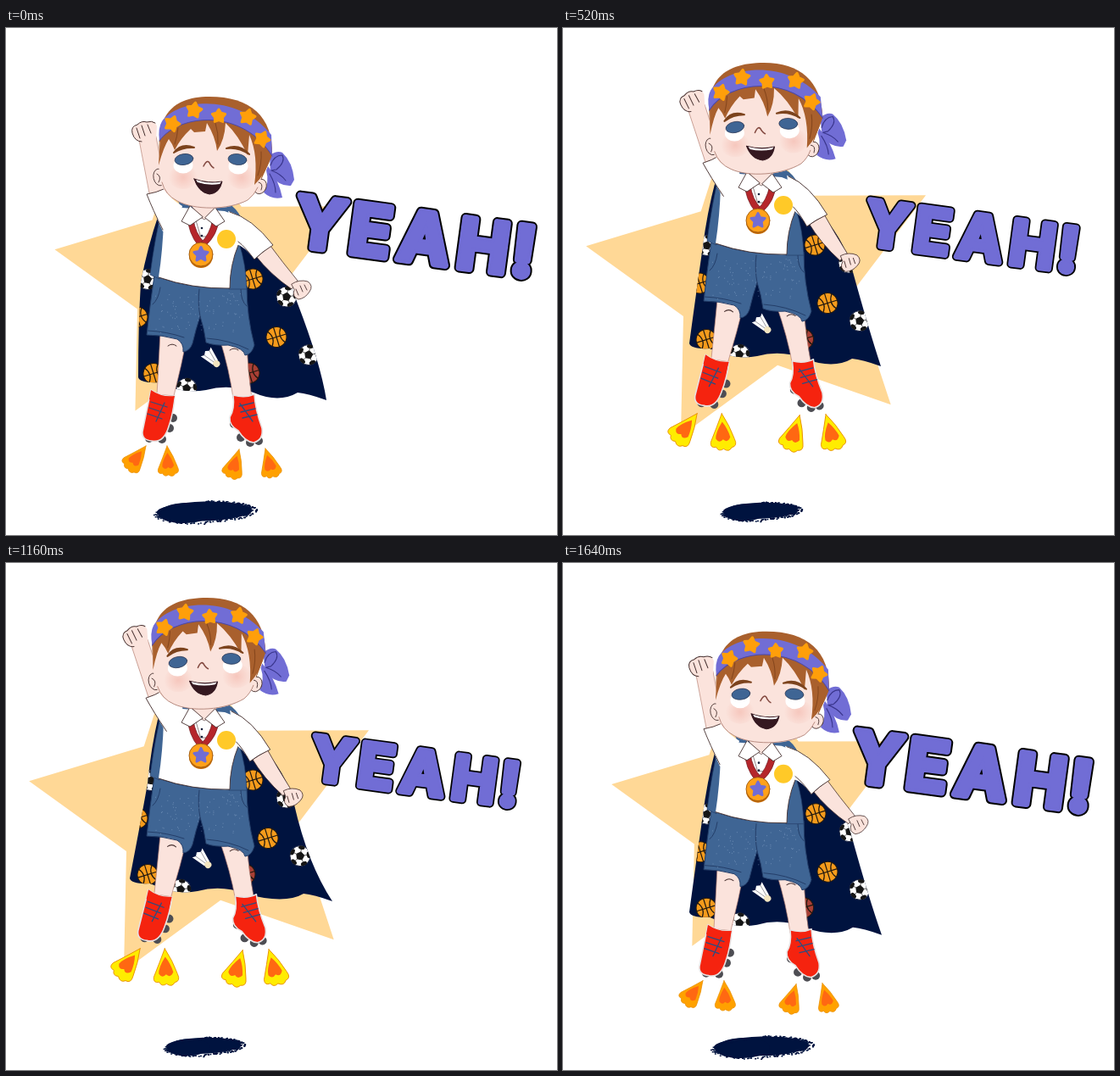
An HTML page with a canvas for the animation above (1680 ms loop, 650x598 px).

```html
<!DOCTYPE html>
<html lang="en">
<head>
<meta charset="utf-8">
<title>Yeah!</title>
<style>
html, body { margin: 0; width: 100%; height: 100%; overflow: hidden; background: #fff; }
canvas { display: block; }
</style>
</head>
<body>
<canvas id="stage" width="650" height="598"></canvas>
<script>
const ctx = document.getElementById('stage').getContext('2d');
const LOOP = 1680, STEP = 40, LIFT = -58.5;
const NAVY = '#00133f', BLUE = '#3f6594', PURPLE = '#716dd5', ORANGE = '#ff9f0a',
  SKIN = '#fbe3dc', HAIR = '#a9602d', RED = '#f5230f', LINE = '#46302f', INK = '#17203c';
const rad = deg => deg * Math.PI / 180;
const lerp = (a, b, k) => a + (b - a) * k;

function paint(path, fill, stroke, width = 1) {
  if (fill) { ctx.fillStyle = fill; ctx.fill(path); }
  if (stroke) { ctx.strokeStyle = stroke; ctx.lineWidth = width; ctx.stroke(path); }
}
const shape = (d, fill, stroke, width) => paint(new Path2D(d), fill, stroke, width);
const line = (d, stroke = LINE, width = 1) => shape(d, null, stroke, width);

function oval(x, y, rx, ry, fill, stroke, width, angle = 0) {
  const path = new Path2D();
  path.ellipse(x, y, rx, ry, rad(angle), 0, Math.PI * 2);
  paint(path, fill, stroke, width);
}

function star(x, y, radius, ratio, angle, fill) {
  const path = new Path2D();
  for (let i = 0; i < 10; i++) {
    const r = i % 2 ? radius * ratio : radius, a = rad(angle - 90 + i * 36);
    path.lineTo(x + r * Math.cos(a), y + r * Math.sin(a));
  }
  path.closePath();
  paint(path, fill, radius < 20 && fill, 3);
}

// Runs draw in a frame moved by (dx, dy) and turned about (px, py).
function posed(px, py, angle, dx, dy, draw) {
  ctx.save();
  ctx.translate(px + dx, py + dy);
  ctx.rotate(rad(angle));
  ctx.translate(-px, -py);
  draw();
  ctx.restore();
}

function seeded(seed) {
  return () => (seed = seed * 16807 % 2147483647) / 2147483647;
}

function drawShadow(p) {
  const rx = lerp(58, 40, p), ry = lerp(12, 9, p), rnd = seeded(7);
  ctx.save();
  ctx.translate(lerp(234, 232.5, p), lerp(570, 569, p));
  ctx.rotate(rad(-1.5));
  oval(0, 0, rx * 0.97, ry * 0.95, NAVY);
  oval(-rx * 0.38, 1.5, rx * 0.55, ry, NAVY);
  ctx.fillStyle = NAVY;
  for (let i = 0; i < 260; i++) {
    const a = rnd() * Math.PI * 2, r = 0.9 + rnd() * 0.16;
    ctx.fillRect(rx * r * Math.cos(a), ry * r * Math.sin(a) + (Math.cos(a) < 0 ? 2 : 0), 2, 1.5);
  }
  ctx.restore();
}

function basketball(x, y, fill = '#f59b1c') {
  ctx.save();
  ctx.translate(x, y);
  ctx.rotate(-0.3);
  oval(0, 0, 12, 12, fill, '#21180f', 1);
  line('M-12 0H12M0 -12V12M-8 -9Q-1 0 -8 9M8 -9Q1 0 8 9', '#21180f', 1.2);
  ctx.restore();
}

function football(x, y) {
  oval(x, y, 12, 12, '#fff', INK, 1);
  star(x, y, 3.6, 0.8, 10, '#151515');
  for (let i = 0; i < 5; i++) {
    const a = rad(i * 72 - 80);
    const c = Math.cos(a), s = Math.sin(a);
    oval(x + 10 * c, y + 10 * s, 2.2, 3.8, '#151515', null, 0, i * 72 - 80);
    line(`M${x + 4 * c} ${y + 4 * s}L${x + 8 * c} ${y + 8 * s}`, '#333', 0.8);
  }
}

function shuttlecock(x, y) {
  posed(x, y, -42, 0, 0, () => {
    shape(`M${x - 8} ${y - 11}L${x - 4} ${y - 9}L${x} ${y - 12}L${x + 4} ${y - 9}L${x + 8} ${y - 11}L${x + 4} ${y + 6}H${x - 4}Z`, '#fff');
    line(`M${x - 4} ${y - 9}L${x - 1} ${y + 5}M${x + 4} ${y - 9}L${x + 1} ${y + 5}`, '#8a8a92', 0.8);
    oval(x, y + 8, 4, 4, '#f3e5c0');
  });
}

// Sideways drift of the cape's upper part, lower part and tip over half a loop.
const SWAY_TIMES = [0, 40, 320, 480, 520, 800, 840];
const SWAY = {
  upper: [0, -3, 0, 2, 6, 7, 0],
  lower: [0, -3, -10, -11.5, -7, -7, 0],
  tip: [0, 5, 7, 5, -3, -2, 0]
};
function sway(part, t) {
  t %= LOOP / 2;
  const i = SWAY_TIMES.findIndex(k => k > t);
  const k = (t - SWAY_TIMES[i - 1]) / (SWAY_TIMES[i] - SWAY_TIMES[i - 1]);
  return lerp(SWAY[part][i - 1], SWAY[part][i], k);
}

function drawCape(t) {
  const u = sway('upper', t), l = sway('lower', t), e = sway('tip', t);
  const cape = new Path2D(`M180 220Q${167 - l * 0.4} 258 ${159 - l * 0.8} 300Q${156 - l * 0.2} 350 ${156 + l} 412
    Q${158 + l} 419 ${180 + l} 418Q${208 + l} 432 ${236 + l} 427Q${264 + l} 419 ${292 + l} 430
    Q${322 + e} 443 ${344 + e} 430Q${356 + e} 431 ${378 + e} 439Q${371 + l * 1.5} 395 ${344 + l * 0.4} 325Q330 285 300 255Z`);
  paint(cape, NAVY);
  ctx.save();
  ctx.clip(cape);
  basketball(291 + u, 296);
  football(331 + u, 317);
  basketball(319 + l, 364.5);
  football(357 + l, 385.5);
  basketball(174 + l * 0.7, 407.5);
  basketball(155 + u, 341);
  football(167 - l * 0.4, 296.5);
  football(213 + l * 0.7, 425);
  basketball(287 + l * 0.5, 407, '#a83f35');
  shuttlecock(243 + l, 390);
  ctx.restore();
}

// Tip at rest and at the top of the jump, then lean.
const FLAMES = [
  [165, 493, 155, 437, 38], [190, 493, 186, 437, -3],
  [275, 497, 281, 438, 17], [306, 496, 312, 437, -15]
];
function drawFlames(p) {
  const heat = Math.min(1, p * 1.35);
  const outer = `rgb(255,${lerp(160, 242, heat)},0)`;
  for (const [x0, y0, x1, y1, lean] of FLAMES) {
    ctx.save();
    ctx.translate(lerp(x0, x1, p), lerp(y0, y1, p));
    ctx.rotate(rad(lean));
    const s = lerp(1, 1.33, p);
    ctx.scale(s, s);
    shape('M0 0Q-6 14 -12 27Q-13 33 -7 32Q-5 37 0 34Q5 38 8 33Q14 32 11 25Q7 12 0 0Z', outer, '#e98e00', 0.7);
    shape('M0 8Q-7 18 -7 24Q-4 29 0 25Q4 29 7 23Q5 15 0 8Z', '#ff6812');
    ctx.restore();
  }
}

function drawLeftLeg() {
  shape('M182 358L214 362Q207 398 198 434L178 432Q180 400 182 358Z', SKIN, '#b88478', 0.7);
  line('M191 375Q196 371 201 375');
  [[197, 460], [193, 472], [184, 485], [169, 484]].forEach(([x, y]) => oval(x, y, 5, 5, '#4d4d53'));
  shape('M171 427Q184 436 199 434Q198 452 192 470Q186 490 172 487Q160 486 161 476Q166 452 171 427Z', RED, '#e8e2e2', 1.6);
  shape('M171 427Q184 436 199 434Q197 442 196 449Q181 444 169 438Z', RED);
  line('M171 441L190 447M169 448L187 454M167 455L184 461M187 442L177 464', '#2f4c7e', 1.3);
}

function drawRightLeg() {
  shape('M252 366L284 370Q285 405 290 437L268 437Q264 405 252 366Z', SKIN, '#b88478', 0.7);
  line('M264 380Q269 376 274 380');
  [[269, 467], [277, 483], [288, 489], [298, 487]].forEach(([x, y]) => oval(x, y, 5, 5, '#4d4d53'));
  shape('M268 433Q282 437 293 432Q294 450 302 472Q304 486 292 489Q282 488 274 475Q263 469 264 459Q270 450 268 433Z', RED, '#e8e2e2', 1.6);
  line('M275 446L292 442M277 453L294 449M279 460L296 456M276 443L291 464', '#2f4c7e', 1.3);
}

function drawShorts() {
  shape('M175 292Q225 312 284 304Q284 340 293 374Q290 385 282 386Q281 378 262 374Q246 375 236 371Q234 355 229 340Q224 355 220 372Q217 381 209 382Q210 372 202 367Q184 362 166 362Q170 325 175 292Z', BLUE, '#243e69', 1);
  line('M229 340Q226 325 228 308M167 357Q190 358 210 365M237 366Q264 368 286 379M182 306Q180 320 173 326M277 308Q277 322 284 328', '#243e69', 1);
  const rnd = seeded(31);
  ctx.fillStyle = 'rgba(150,178,212,.5)';
  for (let i = 0; i < 90; i++) ctx.fillRect(176 + rnd() * 104, 312 + rnd() * 48, 1, 1);
}

function drawTorso() {
  shape('M184 214Q176 245 170 291L181 296L188 235Z', BLUE, '#243e69', 0.7);
  shape('M275 254Q283 278 284 308L263 308L266 272Z', BLUE, '#243e69', 0.7);
  shape('M203 204L262 207Q272 212 278 225L210 221Z', BLUE);
  shape('M208 212L186 226Q185 262 180 294Q220 308 264 307Q264 280 274 256L288 228L258 216Z', '#fff');
  line('M180 294Q220 308 264 307Q264 280 274 256', LINE, 0.9);
}

function drawRightArm() {
  shape('M296 270L312 257Q326 276 344 298L337 308Q312 291 294 268Z', SKIN, LINE, 0.8);
  shape('M337 302Q346 296 356 299Q363 304 358 311Q353 319 345 320Q337 317 340 309Z', SKIN, LINE, 0.8);
  line('M347 304L350 311M352 303L355 309M342 308L345 315', LINE, 0.9);
  shape('M262 216Q290 224 315 256Q302 264 293 273Q282 258 272 255Z', '#fff');
  line('M264 217Q290 224 315 256Q302 264 293 273Q282 258 274 252', LINE, 0.9);
}

function drawLeftArm() {
  shape('M157 132L170 200L190 196L177 128Z', SKIN, '#b88478', 0.7);
  shape('M149 124Q147 116 155 114Q160 109 166 111Q176 108 178 116L177 131Q168 137 160 134Q152 134 149 124Z', SKIN);
  line('M160 134Q152 134 149 124Q147 116 155 114Q160 109 166 111Q172 109 176 112M154 118L158 130M160 115L164 127M167 114L171 124', LINE, 1);
  shape('M166 196Q178 194 186 190Q196 203 208 210L202 240L185 240Q173 214 166 196Z', '#fff');
  line('M185 238Q173 214 166 196Q178 194 186 190', LINE, 0.9);
}

function drawMedal() {
  shape('M218 203H250L246 220L233 226L222 218Z', SKIN);
  shape('M222 219L234 226L245 219L240 246H230Z', '#fff', LINE, 0.6);
  oval(231, 236, 1.3, 1.3, INK);
  oval(231, 245, 1.3, 1.3, INK);
  shape('M214 222L221 225Q223 242 234 253L227 257Q215 242 214 222Z', '#b5262b', '#701a20', 0.7);
  shape('M251 225L244 226Q240 244 230 253L235 257Q250 244 251 225Z', '#b5262b', '#701a20', 0.7);
  shape('M217 210L207 228L217 233L232 223Z', '#fff', LINE, 0.9);
  shape('M247 212L258 228L248 234L235 224Z', '#fff', LINE, 0.9);
  oval(230, 269, 14, 14, '#c36a08');
  oval(230, 267, 14, 14, '#ffa11b', '#9a5710', 0.9);
  star(230, 267, 8.5, 0.5, 0, PURPLE);
  oval(260, 249, 11, 11, '#ffc928');
}

function blush(x, y) {
  const glow = ctx.createRadialGradient(x, y, 0, x, y, 17);
  glow.addColorStop(0, 'rgba(239,157,143,.4)');
  glow.addColorStop(1, 'rgba(239,157,143,0)');
  oval(x, y, 17, 14, glow);
}

function drawHead() {
  shape('M311 150Q320 144 326 147Q338 158 340 179L336 186Q322 187 312 173Z', PURPLE);
  shape('M309 163Q322 180 326 200Q314 203 304 194Q311 182 307 168Z', PURPLE);
  line('M312 162Q316 150 326 150Q330 158 319 167L313 168Q324 172 330 180M311 172Q318 184 318 194', '#39358c', 1.1);
  shape('M181 150C178 110 190 81 240 81C288 81 315 104 314 150L298 186L186 160Z', HAIR);
  oval(181, 176, 7, 10, SKIN, LINE, 0.9, -12);
  oval(300, 187, 7, 9, SKIN, LINE, 0.9, 25);
  shape('M181 135C181 165 177 184 192 197C210 216 262 217 285 203C299 194 305 170 306 140L290 120L240 103L195 116Z', SKIN);
  line('M184 182Q188 197 202 204C222 215 262 215 285 203Q293 197 297 188', '#a8776b', 0.8);
  line('M178 172Q184 175 180 182M298 182Q304 183 301 191', LINE, 0.9);
  blush(209, 176);
  blush(278, 176);
  shape('M182 124L180 162Q186 140 192 131Q196 136 199 144Q206 130 218 119L222 123L235 122L237 112Q247 128 249 145Q258 132 259 112Q274 126 285 150L287 126Q298 150 293 185Q307 172 314 148L308 120Q250 85 182 124Z', HAIR);
  line('M203 118Q202 128 199 137M247 112Q251 124 250 137M301 146Q302 160 297 174', '#84451c', 1);
  shape('M181 133Q179 118 184 110C205 82 275 78 313 126L314 151C280 95 205 100 181 133Z', PURPLE);
  line('M181 133C205 100 280 95 314 151', '#4a47a8', 1);
  star(196, 113, 9, 0.58, 20, ORANGE);
  star(222, 97, 9, 0.58, 10, ORANGE);
  star(251, 104, 8, 0.58, 0, ORANGE);
  star(285, 105, 9, 0.58, 14, ORANGE);
  star(302, 131, 9, 0.58, 25, ORANGE);
  oval(209, 162, 11.5, 9.5, '#fff');
  oval(274, 163, 11.5, 9.5, '#fff');
  oval(210, 155, 11, 6.5, BLUE, INK, 0.6, -8);
  oval(273, 155, 11, 6.5, BLUE, INK, 0.6, 6);
  shape('M198 147Q207 135 222 141Q209 140 198 147Z', '#7c431d', '#7c431d', 2);
  shape('M260 142Q275 136 287 149Q274 140 260 142Z', '#7c431d', '#7c431d', 2);
  line('M233 163Q238 153 241 161Q243 164 245 165', '#82483f', 1.5);
  shape('M222 178Q239 184 255 181Q252 195 240 196Q227 194 222 178Z', '#351820', '#351820', 1);
  shape('M224 179Q239 184.5 254 181.5L252 184Q238 186 226 182Z', '#fff');
}

const LETTERS = [['Y', -112], ['E', -52], ['A', 12], ['H', 82], ['!', 130]];
function drawShout(t) {
  const h = t % (LOOP / 2);
  const u = h < 380 ? 1 - h / 380 : Math.min(1, (h - 380) / 420);
  const size = (248 + 40 * u ** 1.5) / 288;
  ctx.save();
  ctx.translate(482, 245);
  ctx.rotate(rad(7.7));
  ctx.scale(size, size);
  ctx.font = '700 81px Inter, sans-serif';
  ctx.textAlign = 'center';
  for (const [color, width] of [['#000', 12], [PURPLE, 8]]) {
    ctx.fillStyle = ctx.strokeStyle = color;
    ctx.lineWidth = width;
    for (const [letter, x] of LETTERS) {
      ctx.strokeText(letter, x, 30);
      ctx.fillText(letter, x, 30);
    }
  }
  ctx.restore();
}

function render(t) {
  const p = (1 - Math.cos(2 * Math.PI * t / LOOP)) / 2;
  const dy = LIFT * p;
  ctx.fillStyle = '#fff';
  ctx.fillRect(0, 0, 650, 598);
  ctx.lineJoin = ctx.lineCap = 'round';
  drawShadow(p);
  star(lerp(236, 238, p), lerp(291, 293, p), lerp(181, 228, p), 0.5, -8.5, '#ffd896');
  posed(0, 0, 0, 0, dy, () => drawCape(t));
  drawFlames(p);
  posed(205, 365, 4 * p, 0, dy, drawLeftLeg);
  posed(262, 375, -3.5 * p, 0, dy, drawRightLeg);
  posed(0, 0, 0, 0, dy, () => { drawShorts(); drawTorso(); });
  posed(282, 232, 10.7 * p, 0, dy, drawRightArm);
  posed(190, 205, -11 * p, 0, dy, drawLeftArm);
  posed(0, 0, 0, 0, dy, drawMedal);
  posed(238, 212, -5.5 * p, -5 * p, dy, drawHead);
  drawShout(t);
}

function tick() {
  render(Math.floor(performance.now() % LOOP / STEP) * STEP);
  requestAnimationFrame(tick);
}
tick();
</script>
</body>
</html>
```
